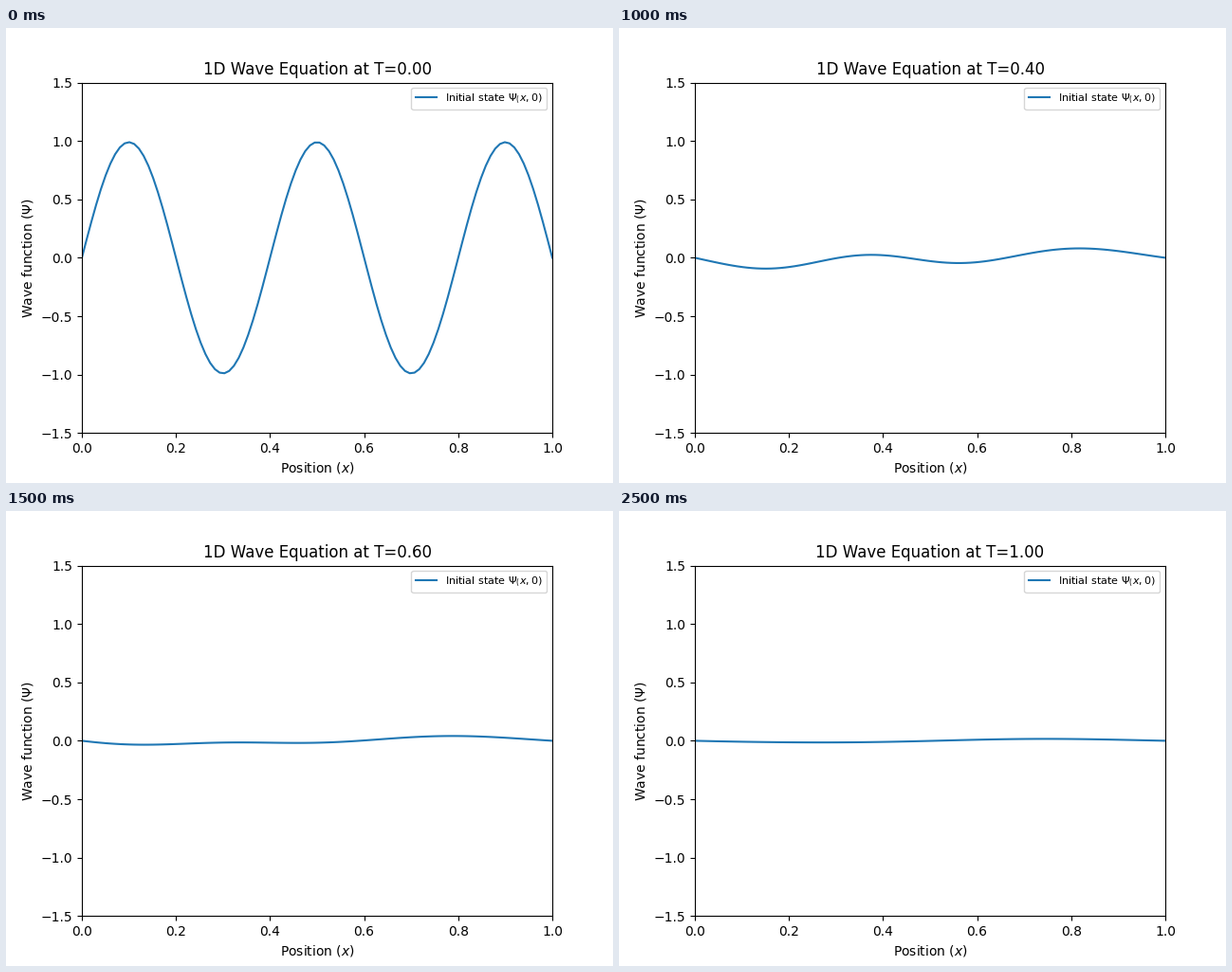
These frames come from a looping animation (640 by 480 pixels, 3 s). A matplotlib script:

```python
import numpy as np
import matplotlib.pyplot as plt
from matplotlib.animation import FuncAnimation

FRAMES = 6
FRAME_MS = 500
FRAME_T = 0.2
COURANT = 0.9

x = np.linspace(0, 1, 100)
dt = COURANT * (x[1] - x[0])
R = COURANT**2


def first_step():
    """Half-weighted opening step from a sine at rest."""
    psi = np.sin(5 * np.pi * x)
    psi[1:-1] += R / 2 * (psi[2:] - 2 * psi[1:-1] + psi[:-2])
    return psi


def sweep(psi):
    """One left-to-right pass in place: the wave damps and drifts left."""
    for j in range(1, len(psi) - 1):
        psi[j] += R * (psi[j + 1] - 2 * psi[j] + psi[j - 1])


def wave_at(t):
    psi = first_step()
    for _ in range(1, round(t / dt)):
        sweep(psi)
    return psi


waves = [wave_at(i * FRAME_T) for i in range(FRAMES)]

plt.rcParams["font.family"] = "DejaVu Sans"
fig, ax = plt.subplots(figsize=(6.4, 4.8), dpi=100)
line, = ax.plot(x, waves[0], color="tab:blue", label=r"Initial state $\Psi_(x,0)$")
ax.set_xlim(0, 1)
ax.set_ylim(-1.5, 1.5)
ax.set_xlabel(r"Position ($x$)")
ax.set_ylabel(r"Wave function ($\Psi$)")
ax.legend(loc="upper right", fontsize=8)
title = ax.set_title("")


def draw(i):
    line.set_ydata(waves[i])
    title.set_text(f"1D Wave Equation at T={i * FRAME_T:.2f}")
    return line, title


anim = FuncAnimation(fig, draw, frames=FRAMES, interval=FRAME_MS,
                     repeat=True, repeat_delay=0, blit=False)
plt.show()
```
